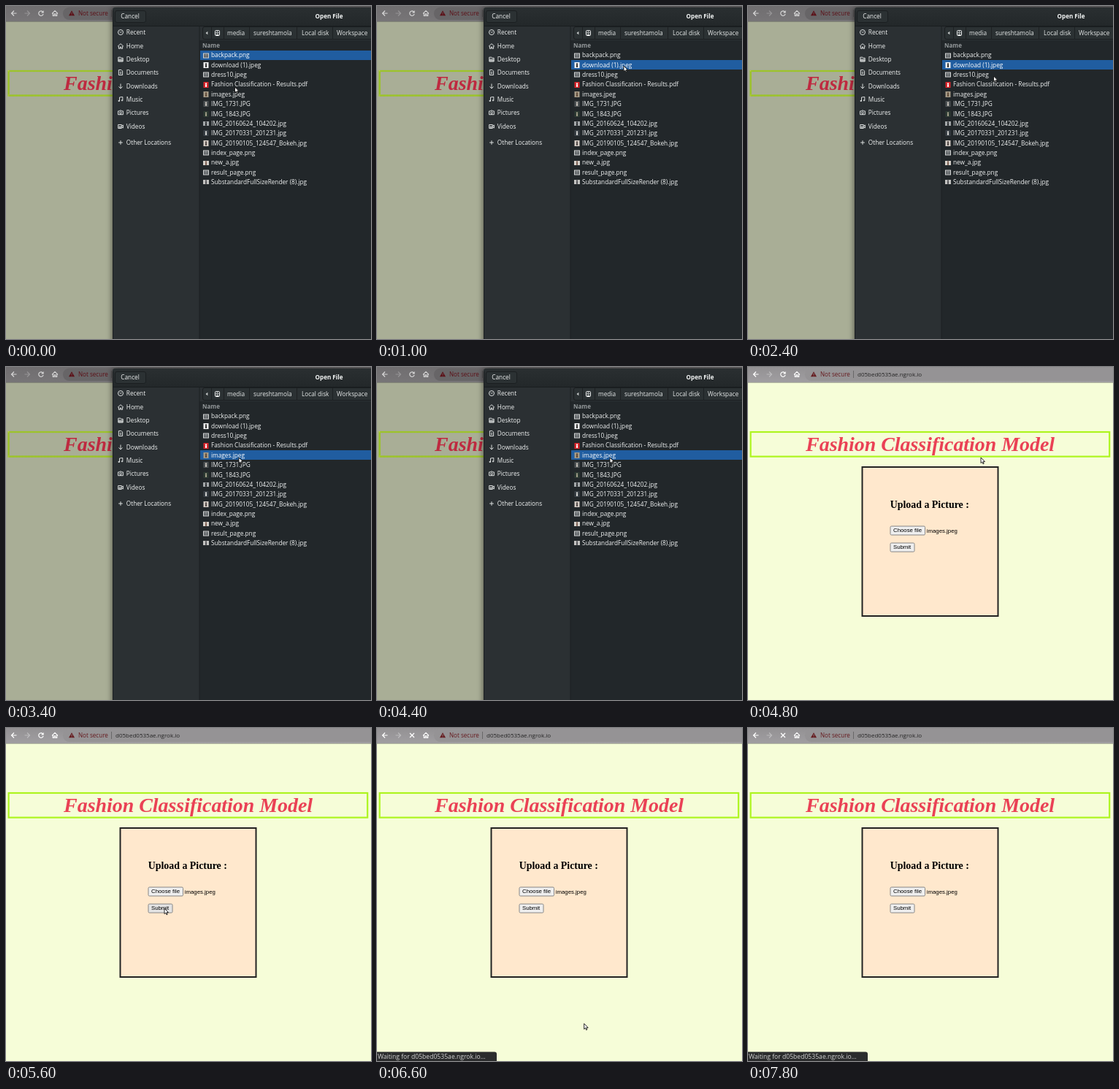
Animation, 500 px wide and 456 px high, one loop 8000 ms. Source, as an HTML page with a canvas:

```html
<!DOCTYPE html>
<html lang="en">
<head>
<meta charset="utf-8">
<title>Upload a picture</title>
<style>
html, body { margin: 0; width: 100%; height: 100%; overflow: hidden; }
canvas { display: block; width: 500px; height: 456px; }
</style>
</head>
<body>
<canvas id="stage" width="500" height="456"></canvas>
<script>
const ctx = document.getElementById('stage').getContext('2d');
const W = 500, H = 456, LOOP = 8000, STEP = 200;
const UI = '"Open Sans", "Noto Sans", sans-serif';
const SANS = '"Liberation Sans", Arial, sans-serif';
const SERIF = '"Liberation Serif", Times, serif';

const TIMES = { close: 4600, lit: 4800, load: 6000, status: 6200 };

const THEMES = {
  covered: { page: '#a9ae96', bar: ['#706e70', '#777577'], pill: '#676567', icon: '#d6d6d6', warn: '#5c1017',
             url: '#1d1d1d', title: '#be2a40', line: '#79b80c', dots: '#c3d04a', panel: '#b3a590',
             button: '#aaa', edge: '#666' },
  dim: { page: '#cbd1b4', bar: ['#807e80', '#8c8a8d'], pill: '#7f7d80', icon: '#ededed', warn: '#60161b',
         url: '#222', title: '#d1303f', line: '#8cdc00', dots: '#d3ea3a', panel: '#d4c3ab',
         button: '#c6c6c6', edge: '#777' },
  lit: { page: '#f6fdd8', bar: ['#939193', '#a09ea1'], pill: '#959395', icon: '#fff', warn: '#661b1f',
         url: '#262626', title: '#ea4155', line: '#adf51e', panel: '#ffe8cd', button: '#efefef', edge: '#858585' }
};

const PLACES = [['Recent', 36], ['Home', 55], ['Desktop', 73], ['Documents', 91], ['Downloads', 110],
  ['Music', 128], ['Pictures', 146], ['Videos', 165], ['Other Locations', 187]];

const CRUMBS = [['media', 303], ['sureshtamola', 339], ['Local disk', 405], ['Workspace', 453]];

// name, thumbnail background, thumbnail figure (no colours: generic image icon), landscape
const FILES = [
  ['backpack.png'],
  ['download (1).jpeg', '#f2f2f2', '#222'],
  ['dress10.jpeg'],
  ['Fashion Classification - Results.pdf', '#d8262c', '#fff'],
  ['images.jpeg', '#a59a86', '#5a4330'],
  ['IMG_1731.JPG', '#4d5254', '#c9c4bd'],
  ['IMG_1843.JPG', '#2d3a33', '#a8a48e'],
  ['IMG_20160624_104202.jpg', '#a3a7a9', '#25282b', true],
  ['IMG_20170331_201231.jpg', '#3a4147', '#dcdcda'],
  ['IMG_20190105_124547_Bokeh.jpg', '#d1c9c2', '#453c3a'],
  ['index_page.png'],
  ['new_a.jpg', '#d5d0ca', '#76574a', true],
  ['result_page.png'],
  ['SubstandardFullSizeRender (8).jpg', '#c3c3c1', '#4d4d51', true]
];

// time, x, y of the pointer tip
const PATH = [[0, 313.5, 111], [200, 313.5, 111], [800, 338, 82], [1600, 338, 82], [2200, 336.5, 96],
  [2600, 336.5, 96], [3200, 319, 124], [4800, 319, 124], [5600, 217, 247], [6200, 217, 247], [6800, 307, 460]];

// time, selected row
const PICKS = [[0, 0], [1000, 1], [3200, 4]];

function text(str, x, y, size, color, font = UI, style = '') {
  ctx.font = `${style} ${size}px ${font}`;
  ctx.fillStyle = color;
  ctx.fillText(str, x, y);
}

function label(str, x, y, color = '#f1f3f3') {
  text(str, x, y, 8.25, color, UI, '500');
}

function box(x, y, w, h, color) {
  ctx.fillStyle = color;
  ctx.fillRect(x, y, w, h);
}

function round(x, y, w, h, r, fill, edge) {
  ctx.beginPath();
  ctx.roundRect(x, y, w, h, r);
  if (fill) { ctx.fillStyle = fill; ctx.fill(); }
  if (edge) { ctx.strokeStyle = edge; ctx.lineWidth = 1; ctx.stroke(); }
}

function stroke(d, color, width = 1, x = 0, y = 0) {
  ctx.save();
  ctx.translate(x, y);
  ctx.strokeStyle = color;
  ctx.lineWidth = width;
  ctx.stroke(new Path2D(d));
  ctx.restore();
}

function shape(d, color, x = 0, y = 0) {
  ctx.save();
  ctx.translate(x, y);
  ctx.fillStyle = color;
  ctx.fill(new Path2D(d));
  ctx.restore();
}

function vertical(y0, y1, from, to) {
  const g = ctx.createLinearGradient(0, y0, 0, y1);
  g.addColorStop(0, from);
  g.addColorStop(1, to);
  return g;
}

function toolbar(c, loading) {
  box(0, 0, W, 21, vertical(0, 21, ...c.bar));
  box(0, 21, W, 1, 'rgba(60,60,60,.35)');
  round(78, 1.5, 440, 17.5, 9, c.pill);
  stroke('M3.5 0H-3.5M0 -3.5L-3.5 0L0 3.5', c.icon, 1.2, 11, 10);
  ctx.globalAlpha = 0.35;
  stroke('M-3.5 0H3.5M0 -3.5L3.5 0L0 3.5', c.icon, 1.2, 29, 10);
  ctx.globalAlpha = 1;
  if (loading) {
    stroke('M-3 -3L3 3M3 -3L-3 3', c.icon, 1.3, 48, 10);
  } else {
    stroke('M2.4 -2A3.2 3.2 0 1 0 3.1 .8', c.icon, 1.2, 48, 10);
    shape('M3.7 -4V-.4H.1Z', c.icon, 48, 10);
  }
  stroke('M-4 .3L0 -3.6L4 .3M-2.7 -.6V3.4H-.8V.9H.8V3.4H2.7V-.6', c.icon, 1.1, 67, 10);
  shape('M0 -3.8L4 3.3H-4Z', c.warn, 90, 10);
  box(89.6, 8.6, 0.9, 2.2, c.pill);
  box(89.6, 11.5, 0.9, 0.9, c.pill);
  text('Not secure', 99, 13, 8.1, c.warn, UI, '500');
  box(144, 5, 1, 10, 'rgba(60,60,60,.5)');
  text('d05bed0535ae.ngrok.io', 150, 13, 8, c.url);
}

function button(name, y, w, c, fill) {
  round(195, y + 0.5, w, 12, 1.5, fill, c.edge);
  text(name, 199, y + 8.6, 7.8, '#000', SANS);
}

function banner(c) {
  ctx.strokeStyle = c.line;
  ctx.lineWidth = 2.2;
  ctx.strokeRect(3.6, 89, 491.6, 33.6);
  if (c.dots) {
    ctx.setLineDash([1, 1]);
    ctx.strokeStyle = c.dots;
    ctx.strokeRect(3.6, 89, 491.6, 33.6);
    ctx.setLineDash([]);
  }
  ctx.textAlign = 'center';
  text('Fashion Classification Model', 249.6, 115, 27.9, c.title, SERIF, 'italic bold');
  ctx.textAlign = 'left';
}

function page(c, t) {
  box(0, 0, W, H, c.page);
  toolbar(c, t >= TIMES.load);
  banner(c);

  box(155.5, 136, 188, 206, '#222');
  box(157.5, 138, 184, 202, c.panel);
  text('Upload a Picture :', 194.7, 193, 13.9, '#000', SERIF, 'bold');
  button('Choose file', 217.5, 47.5, c, c.button);
  text('images.jpeg', 244.8, 226.5, 7.8, '#000', SANS);
  const hover = t >= 5600 && t <= 6200;
  button('Submit', 240.5, 33, c, hover ? '#e4e4e4' : c.button);

  if (t >= TIMES.status) {
    round(-4, 443.5, 168, 18, 3, '#2b2c2d');
    text('Waiting for d05bed0535ae.ngrok.io…', 1, 453, 8.6, '#d2d2d2');
  }
}

const PLACE_ICONS = [
  'M3.5 0A3.5 3.5 0 1 1 -3.5 0A3.5 3.5 0 1 1 3.5 0M-1.5 -1L0 .5L1.6 -1',
  'M-4 .3L0 -3.3L4 .3M-2.6 0V3.3H-.7V1H.7V3.3H2.6V0',
  'M-3.2 -2.8H0L.8 -1.8H3.2V3H-3.2ZM-3 0H3M-3 1.2H3M-3 2.2H3',
  'M-2.6 -3.5H1L2.6 -1.9V3.5H-2.6ZM-1.2 -.4H1.2M-1.2 1.4H1.2',
  'M0 -3.5V2.8M-2.5 .4L0 3L2.5 .4',
  'M-1.5 2.4V-3L2.8 -3.5V1.7M-1.5 2.4H-3V1.4H-1.5M2.8 1.7H1.3V.8H2.8',
  'M-3.4 -2.1H-1.5L-.9 -3H.9L1.5 -2.1H3.4V2.7H-3.4ZM1.4 .3A1.4 1.4 0 1 1 -1.4 .3A1.4 1.4 0 1 1 1.4 .3',
  'M-3.3 -2.5H1.3V2.5H-3.3ZM1.3 -.4L3.4 -2V2L1.3 .5M-2.5 0H.6M-2.5 1.2H.6',
  'M-2.8 0H2.8M0 -2.8V2.8'
];

function thumb(y, back, figure, wide) {
  if (!back) {
    box(270, y - 3.5, 8, 7, '#d6d8d8');
    box(271, y - 2.5, 6, 5, '#4a4f52');
    box(271.5, y - 1.5, 5, 1, '#a7abad');
    box(271.5, y + 0.5, 5, 1, '#8b9092');
    return;
  }
  if (wide) box(270, y - 3, 8, 6, back);
  else box(270.5, y - 4, 7, 8, back);
  ctx.fillStyle = figure;
  ctx.beginPath();
  ctx.arc(274, y - 1.6, 1.1, 0, 7);
  ctx.fill();
  box(273, y - 0.6, 2, 3.4, figure);
}

function dialog(selected) {
  ctx.save();
  ctx.shadowColor = 'rgba(0,0,0,.6)';
  ctx.shadowBlur = 9;
  round(146, 2, 370, H + 20, 4, '#2b3033');
  ctx.restore();

  box(265, 27, 235, H - 27, '#22272a');
  box(265, 27, 235, 20, '#2b3033');
  round(146, 2, 370, 25, [4, 0, 0, 0], vertical(2, 27, '#2a2f31', '#23282a'));
  box(146, 27, 354, 1, '#191d1f');
  box(264.5, 28, 1, H, '#1c2022');
  box(146, 6, 1, H, '#1b1f21');
  round(149.5, 6.5, 42, 16, 2.5, '#2b3133', '#1b1f21');
  label('Cancel', 157.3, 17.4);
  text('Open File', 423.6, 17.2, 8.1, '#f5f7f7', UI, 'bold');

  PLACES.forEach(([name, y], i) => {
    stroke(PLACE_ICONS[i], '#dadddd', 1, 157, y);
    label(name, 164.8, y + 3);
  });

  round(269.5, 28.5, 240, 17, 2.5, '#2b3133', '#1a1e20');
  shape('M1.3 -2.3V2.3L-1.5 0Z', '#c9cccc', 275, 37);
  for (const x of [281, 298, 333, 398, 447]) box(x, 29, 1, 17, '#1d2123');
  round(286.5, 33.5, 6, 7, 1, null, '#f1f3f3');
  round(288.3, 35.3, 2.4, 2.4, 1.2, null, '#f1f3f3');
  box(287.5, 39, 4, 1, '#f1f3f3');
  for (const [name, x] of CRUMBS) label(name, x, 40, '#e6e9e9');

  text('Name', 269, 57, 8, '#94999b', UI, 'bold');
  FILES.forEach(([name, ...look], i) => {
    const y = 67.5 + i * 13.37;
    if (i === selected) box(266, Math.round(y - 6.6), 234, 13, '#205da0');
    thumb(Math.round(y), ...look);
    label(name, 281, y + 2.8, i === selected ? '#fff' : undefined);
  });
}

function pointer(t) {
  if (t >= 6800) return;
  const i = PATH.findIndex(p => p[0] > t);
  const [t0, x0, y0] = PATH[i - 1], [t1, x1, y1] = PATH[i];
  const u = (t - t0) / (t1 - t0), k = u * u * (3 - 2 * u);
  const x = x0 + (x1 - x0) * k, y = y0 + (y1 - y0) * k;
  const arrow = 'M0 0V7.6L1.8 6L3 8.8L4.2 8.2L3.1 5.6H5.5Z';
  shape(arrow, '#fff', x, y);
  stroke(arrow, '#151515', 0.9, x, y);
}

function draw(t) {
  const open = t < TIMES.close;
  page(open ? THEMES.covered : t < TIMES.lit ? THEMES.dim : THEMES.lit, t);
  if (open) dialog(PICKS.filter(p => p[0] <= t).pop()[1]);
  pointer(t);
}

const start = performance.now();
function tick() {
  const t = (performance.now() - start) % LOOP;
  draw(Math.floor(t / STEP) * STEP);
  requestAnimationFrame(tick);
}
tick();
</script>
</body>
</html>
```
